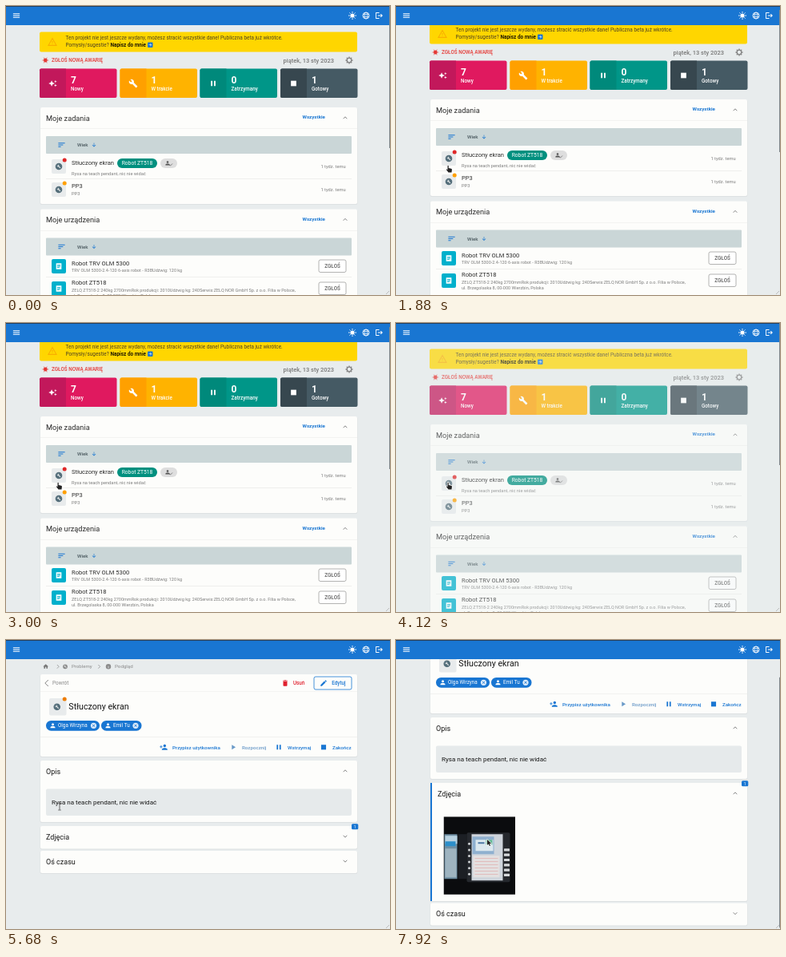
Write an HTML page with a canvas that moves like this. It is 480 by 362 pixels and loops after 8 s.

```html
<!DOCTYPE html>
<html lang="pl">
<head>
<meta charset="utf-8">
<title>Panel zgłoszeń</title>
<style>
html, body { margin: 0; width: 100%; height: 100%; overflow: hidden; background: #e8eced; }
canvas { display: block; width: 480px; height: 362px; }
</style>
</head>
<body>
<canvas id="stage" width="480" height="362"></canvas>
<script>
const ctx = document.getElementById('stage').getContext('2d');
const LOOP = 8000, W = 480, H = 362, BAR = 24;
const BLUE = '#1976d2', BG = '#e8eced', PAPER = '#fdfdfb', INK = '#2b2b2b', GREY = '#7c7c7c', SLATE = '#546e7a';

const PATHS = {
  menu: 'M3 6h18v2H3zm0 5h18v2H3zm0 5h18v2H3z',
  sort: 'M3 6h18v2H3zm0 5h13v2H3zm0 5h7v2H3z',
  home: 'M10 20v-6h4v6h5v-8h3L12 3 2 12h3v8z',
  person: 'M12 12a4 4 0 1 0 0-8 4 4 0 0 0 0 8zm0 2c-2.7 0-8 1.3-8 4v2h16v-2c0-2.7-5.3-4-8-4z',
  addPerson: 'M15 12a4 4 0 1 0 0-8 4 4 0 0 0 0 8zm0 2c-2.7 0-8 1.3-8 4v2h16v-2c0-2.7-5.3-4-8-4zM4 7h2v3h3v2H6v3H4v-3H1v-2h3z',
  trash: 'M6 19c0 1.1.9 2 2 2h8c1.1 0 2-.9 2-2V7H6zM19 4h-3.5l-1-1h-5l-1 1H5v2h14z',
  pencil: 'M3 17.25V21h3.75L17.8 9.9l-3.75-3.75zM20.7 7a1 1 0 0 0 0-1.4l-2.3-2.3a1 1 0 0 0-1.4 0l-1.8 1.8 3.75 3.75z',
  wrench: 'M22.7 19l-9.1-9.1c.9-2.3.4-5-1.5-6.9-2-2-5-2.4-7.4-1.3L9 6 6 9 1.6 4.7C.4 7.1.9 10.1 2.9 12.1c1.9 1.9 4.6 2.4 6.9 1.5l9.1 9.1c.4.4 1 .4 1.4 0l2.3-2.3c.5-.4.5-1.1.1-1.4z',
  play: 'M8 5v14l11-7z',
  pause: 'M6 19h4V5H6zm8-14v14h4V5z',
  stop: 'M5 5h14v14H5z',
  sparkle: 'M9 4l2.5 5.5L17 12l-5.5 2.5L9 20l-2.5-5.5L1 12l5.5-2.5zM19 3l1 3 3 1-3 1-1 3-1-3-3-1 3-1zm0 10l1 3 3 1-3 1-1 3-1-3-3-1 3-1z',
  logout: 'M17 7l-1.4 1.4 2.6 2.6H8v2h10.2l-2.6 2.6L17 17l5-5zM4 5h8V3H2v18h10v-2H4z',
  warning: 'M1 21h22L12 2zM12 6l7.5 13h-15zM11 10h2v4h-2zm0 5h2v2h-2z',
  down: 'M11 4h2v12l5-5 1.4 1.4L12 20l-7.4-7.6L6 11l5 5z',
  right: 'M4 11h12l-5-5 1.4-1.4L20 12l-7.6 7.4L11 18l5-5H4z',
  list: 'M4 3h16v18H4zM7 7h10v2H7zm0 4h10v2H7zm0 4h7v2H7z',
  arrow: 'M0 0v15l3.6-3.4L6 17l2.6-1.1-2.3-5.2H11z',
  hand: 'M5 1.5C5 .2 7.5.2 7.5 1.5V7l6.5 1.4c1.6.4 2 1.4 1.8 3L15 18H7L2 11.5c-.8-1.4 1-2.4 2-1.2l1 1z'
};
for (const key in PATHS) PATHS[key] = new Path2D(PATHS[key]);

const clamp = v => Math.max(0, Math.min(1, v));
const phase = (t, from, to) => clamp((t - from) / (to - from));
const ease = p => p * p * (3 - 2 * p);
const easeOut = p => 1 - (1 - p) ** 3;
const mix = (a, b, p) => a + (b - a) * p;

function rect(x, y, w, h, fill, r = 0, stroke) {
  ctx.beginPath();
  ctx.roundRect(x, y, w, h, r);
  if (fill) { ctx.fillStyle = fill; ctx.fill(); }
  if (stroke) { ctx.strokeStyle = stroke; ctx.lineWidth = .8; ctx.stroke(); }
}
function dot(x, y, r, fill) {
  ctx.beginPath();
  ctx.arc(x, y, r, 0, 7);
  ctx.fillStyle = fill;
  ctx.fill();
}
function ring(x, y, r, color, width, from = 0, to = 7) {
  ctx.beginPath();
  ctx.arc(x, y, r, from, to);
  ctx.strokeStyle = color;
  ctx.lineWidth = width;
  ctx.stroke();
}
function line(points, color, width = 1) {
  ctx.beginPath();
  points.forEach(([x, y]) => ctx.lineTo(x, y));
  ctx.strokeStyle = color;
  ctx.lineWidth = width;
  ctx.stroke();
}
function text(str, x, y, size, color = INK, weight = 400, align = 'left') {
  ctx.font = `${weight} ${size}px Roboto, sans-serif`;
  ctx.fillStyle = color;
  ctx.textAlign = align;
  ctx.fillText(str, x, y);
}
function icon(name, x, y, size, color) {
  ctx.save();
  ctx.translate(x - size / 2, y - size / 2);
  ctx.scale(size / 24, size / 24);
  ctx.fillStyle = color;
  ctx.fill(PATHS[name], 'evenodd');
  ctx.restore();
}
function spokes(x, y, inner, outer, count, color, width) {
  for (let i = 0; i < count; i++) {
    const a = i * 2 * Math.PI / count, c = Math.cos(a), s = Math.sin(a);
    line([[x + c * inner, y + s * inner], [x + c * outer, y + s * outer]], color, width);
  }
}
// dir: 1 points down, -1 points up
const chevron = (x, y, dir) => line([[x - 2.3, y - 1.2 * dir], [x, y + 1.2 * dir], [x + 2.3, y - 1.2 * dir]], '#777', .9);
const chevronSide = (x, y, dir, s, color) => line([[x - s * dir / 2, y - s], [x + s * dir / 2, y], [x - s * dir / 2, y + s]], color, .9);

function card(y, h) {
  rect(42.5, y + .5, 397, h + .5, '#dde1e2', 2);
  rect(43, y, 396, h, PAPER, 2);
}

function header() {
  rect(0, 0, W, BAR, BLUE);
  rect(0, 0, W, 1, '#25405c');
  icon('menu', 13, 12, 11, '#fff');
  dot(433, 12, 2.6, '#fff');
  spokes(433, 12, 3.4, 5, 8, '#fff', 1);
  ring(450, 12, 4, '#fff', .9);
  ctx.beginPath();
  ctx.ellipse(450, 12, 1.8, 4, 0, 0, 7);
  ctx.lineWidth = .7;
  ctx.stroke();
  line([[446, 10.6], [454, 10.6]], '#fff', .7);
  line([[446, 13.4], [454, 13.4]], '#fff', .7);
  icon('logout', 466.5, 12, 10.5, '#fff');
}

function statusCard(x, color, side, name, count, label) {
  rect(x, 78.5, 96.5, 36.5, color, 2);
  rect(x, 78.5, 33, 36.5, side, [2, 0, 0, 2]);
  icon(name, x + 16.5, 97, 11.5, '#fff');
  text(count, x + 39, 96.5, 12, '#fff', 700);
  text(label, x + 39, 106, 6.3, '#fff', 500);
}

function listHead(y, title) {
  text(title, 50, y + 16.7, 9.2);
  text('Wszystkie', 370.5, y + 14.3, 6.2, BLUE, 700);
  chevron(424, y + 13, -1);
  rect(43, y + 26.5, 396, .6, '#e9e9e7');
  rect(50, y + 36, 382, 22, '#cad6d7', 1);
  icon('sort', 69.5, y + 47, 11, BLUE);
  text('Wiek', 89, y + 49.2, 6.2, '#4c5a60', 500);
  icon('down', 110, y + 47, 7.5, BLUE);
}

function toolTile(x, y, size, badge) {
  rect(x, y, size, size, '#e8ebec', 2);
  const cx = x + size / 2 + (size > 20 ? -1 : 0), cy = y + size / 2;
  dot(cx, cy, 4.3, SLATE);
  icon('wrench', cx, cy, 5, '#e8ebec');
  dot(x + 16.2 + (size > 20 ? 3 : 0), y + 1, 2.5, badge);
}

function device(y, title, notes) {
  const lift = (notes.length - 1) * 3.2;
  rect(57, y, 18, 18, '#00b0cc', 2);
  icon('list', 66, y + 9, 10, '#fff');
  text(title, 82, y + 7.6 - lift, 7.55);
  notes.forEach((note, i) => text(note, 82, y + 15.8 - lift * .75 + i * 6.4, 5.5, GREY));
  rect(391, y + 1, 34, 15.5, '#fff', 2, '#a0a0a0');
  text('ZGŁOŚ', 408, y + 11, 6.3, '#606060', 500, 'center');
}

function mainPage() {
  rect(42, 32.5, 397, 25, '#ffd600', 2);
  icon('warning', 58, 45, 13, '#f9ae00');
  text('Ten projekt nie jest jeszcze wydany, możesz stracić wszystkie dane! Publiczna beta już wkrótce.', 74.5, 42.4, 6.42, '#4d4320');
  text('Pomysły/sugestie?', 74.5, 51.2, 6.42, '#4d4320');
  text('Napisz do mnie', 130.5, 51.2, 6.42, '#1c1800', 700);
  rect(177, 45.5, 6.5, 6.5, BLUE, 1);
  icon('right', 180.2, 48.7, 5.5, '#fff');

  spokes(49.3, 68, 2, 3.9, 6, '#e53935', .7);
  dot(49.3, 68, 2.4, '#e53935');
  text('ZGŁOŚ NOWĄ AWARIĘ', 57, 70.2, 6.3, '#e53935', 500);
  text('piątek, 13 sty 2023', 346.5, 70.7, 7.5, '#777', 500);
  ring(429, 68, 2.8, '#858585', 1.3);
  spokes(429, 68, 3, 4.5, 8, '#858585', 1.4);

  statusCard(42, '#e0195f', '#c2185b', 'sparkle', '7', 'Nowy');
  statusCard(142.5, '#ffb300', '#ffa000', 'wrench', '1', 'W trakcie');
  statusCard(242.5, '#009688', '#00897b', 'pause', '0', 'Zatrzymany');
  statusCard(343, '#455a64', '#37474f', 'stop', '1', 'Gotowy');

  card(127, 121);
  listHead(127, 'Moje zadania');
  toolTile(57, 192, 18, '#e02828');
  text('Stłuczony ekran', 82, 199.2, 7.5);
  rect(139, 191, 50, 12, '#00907f', 6);
  text('Robot ZT518', 164, 199.2, 6.7, '#fff', 400, 'center');
  rect(193, 191, 21, 12, '#dedede', 6);
  icon('person', 202, 196.8, 8, '#555');
  line([[204, 199], [205.5, 200], [208, 197.5]], '#555', .7);
  text('Rysa na teach pendant, nic nie widać', 82, 211.8, 5.7, GREY);
  text('1 tydz. temu', 393.5, 203, 5.7, GREY);
  rect(50, 216, 382, .6, '#e2e2e0');
  toolTile(57, 221, 18, '#ffa000');
  text('PP3', 82, 228.2, 7.5);
  text('PP3', 82, 236.5, 5.7, GREY);
  text('1 tydz. temu', 393.5, 231.7, 5.7, GREY);

  card(254.5, 140);
  listHead(254.5, 'Moje urządzenia');
  device(317, 'Robot TRV OLM 5300', ['TRV OLM 5300-2.4-120 6-axis robot - R3BUdźwig: 120 kg']);
  rect(50, 339.5, 382, .6, '#e2e2e0');
  device(345, 'Robot ZT518', [
    'ZELQ ZT518-2 240kg 2700mmRok produkcji: 2010Udźwig kg: 240Serwis:ZELQ NOR GmbH Sp. z o.o. Filia w Polsce,',
    'ul. Brzegolaska 8, 00-000 Wierzbin, Polska']);
}

function userChip(x, w, name) {
  rect(x, 101, w, 12.7, BLUE, 6.3);
  icon('person', x + 8.5, 107.2, 9, '#fff');
  text(name, x + 15, 109.4, 6.3, '#fff');
  const cx = x + w - 7.5;
  dot(cx, 107.3, 3.6, '#dcebfa');
  line([[cx - 1.5, 105.8], [cx + 1.5, 108.8]], BLUE, .9);
  line([[cx + 1.5, 105.8], [cx - 1.5, 108.8]], BLUE, .9);
}

function action(x, name, label, color = BLUE) {
  icon(name, x, 134.3, 10.5, color);
  text(label, x + 11, 136.6, 6.2, color, 500);
}

function photo(x, y, veil) {
  ctx.save();
  ctx.beginPath();
  ctx.rect(x, y, 89.5, 97.5);
  ctx.clip();
  rect(x, y, 90, 98, '#0b0c0e');
  rect(x + 1, y + 22, 16, 56, '#6f8fa3');
  rect(x + 2, y + 24, 15, 10, '#b9d2e0');
  rect(x + 2, y + 31, 13, 6, '#2d8fca');
  rect(x + 2, y + 40, 14, 36, '#9fb4c0');
  rect(x + 18, y + 22, 11, 56, '#1c1f24');
  rect(x + 29, y + 20, 54, 62, '#25282d', 2);
  rect(x + 35, y + 22, 39, 58, '#cfd5dc');
  rect(x + 36, y + 25, 27, 22, '#8fb0cf');
  rect(x + 40, y + 29, 22, 14, '#dce8ee');
  rect(x + 43, y + 32, 8, 2, '#4d78a4');
  rect(x + 53, y + 29, 8, 6, '#63b794');
  rect(x + 37, y + 49, 33, 27, '#e3e0e0');
  for (let i = 0; i < 6; i++) {
    dot(x + 32, y + 34 + i * 7.6, 1.5, '#cfd2d4');
    rect(x + 75.5, y + 40 + i * 6.3, 7, 3.2, '#d5d8da', .5);
    rect(x + 39, y + 52 + i * 4, 29, .5, '#d99');
  }
  if (veil > 0) rect(x, y, 90, 98, `rgba(214,214,214,${veil})`);
  ctx.restore();
}

function detailPage(t) {
  icon('home', 49.7, 33.2, 8, '#777');
  chevronSide(65, 33.3, 1, 2.3, '#999');
  dot(74, 33.3, 2.9, '#8c8c8c');
  icon('wrench', 74, 33.3, 3.5, BG);
  text('Problemy', 82, 35.4, 6.1, '#8a8a8a');
  chevronSide(116.5, 33.3, 1, 2.3, '#999');
  dot(128, 33.3, 3.2, '#8c8c8c');
  rect(127.6, 32.8, .8, 2.4, BG);
  text('Podgląd', 136, 35.4, 6.2, '#8a8a8a');

  card(43, 103);
  chevronSide(50.8, 54, -1, 4, '#777');
  text('Powrót', 58, 56.2, 6.4, '#8a8a8a');
  icon('trash', 349, 54, 10, '#e0202e');
  text('Usuń', 359, 56.2, 6.3, '#e0202e', 500);
  rect(385, 46, 47, 16, null, 2, BLUE);
  icon('pencil', 397, 54, 10, BLUE);
  text('Edytuj', 407.3, 56.2, 6.3, BLUE, 500);
  rect(43, 64.5, 396, .6, '#ececea');
  toolTile(54, 73, 21.5, '#ee7d00');
  text('Stłuczony ekran', 78.3, 87, 10.7, '#151515');
  userChip(50, 67, 'Olga Wirzyna');
  userChip(119, 50.5, 'Emil Tu');
  rect(43, 121.5, 396, .6, '#e6e6e4');
  action(197, 'addPerson', 'Przypisz użytkownika');
  action(284, 'play', 'Rozpocznij', '#6b9ac8');
  action(341, 'pause', 'Wstrzymaj');
  action(397, 'stop', 'Zakończ');

  card(151, 77);
  text('Opis', 50, 168.2, 9, '#151515');
  chevron(424, 164, -1);
  rect(50, 186.5, 382, 33.5, '#e6eaeb', 2);
  text('Rysa na teach pendant, nic nie widać', 57, 206, 8.05, '#151515');

  const open = ease(phase(t, 6520, 6880));
  const height = mix(28.5, 148, open);
  card(233, height);
  ctx.save();
  ctx.beginPath();
  ctx.rect(43, 233, 396, height);
  ctx.clip();
  if (open > 0) {
    rect(43, 233, 2 * open, height, BLUE);
    photo(59.5, 275.3, .72 * (1 - phase(t, 7400, 7640)));
    if (t < 7480) {
      const a = t / 180;
      ring(104, 324, 9, '#4a4a4a', 2.4, a, a + 2.2);
    }
  }
  ctx.restore();
  text('Zdjęcia', 50 + 2 * open, 249.6, 9, '#151515');
  chevron(424, 246, open > .5 ? -1 : 1);
  rect(432, 230.3, 8.3, 7, BLUE, 1.5);
  text('1', 436.1, 235.7, 5, '#fff', 400, 'center');

  const top = 236 + height - .5;
  card(top, 28);
  text('Oś czasu', 50, top + 16.8, 9, '#151515');
  chevron(424, top + 13, 1);
}

function scrollbar(scroll, pageHeight) {
  rect(479, scroll * H / pageHeight, 1, H * H / pageHeight, '#7f878b');
}

function pointer(name, x, y, size) {
  ctx.save();
  ctx.translate(x, y);
  ctx.scale(size / 18, size / 18);
  ctx.lineJoin = 'round';
  ctx.lineWidth = 2.6;
  ctx.strokeStyle = '#fff';
  ctx.stroke(PATHS[name]);
  ctx.fillStyle = '#222';
  ctx.fill(PATHS[name]);
  ctx.restore();
}
function textCursor(x, y) {
  line([[x, y - 4], [x, y + 4]], '#555', .9);
  line([[x - 1.8, y - 4.2], [x + 1.8, y - 4.2]], '#555', .8);
  line([[x - 1.8, y + 4.2], [x + 1.8, y + 4.2]], '#555', .8);
}

function cursor(t) {
  if (t < 80) return;
  if (t < 1000) {
    const p = ease(phase(t, 80, 800));
    pointer('arrow', mix(18, 63, p), mix(294, 199, p), 8.5);
  } else if (t < 4880) {
    pointer('hand', 62, 199.5, 9);
  } else if (t < 5720) {
    textCursor(67, 208.8);
  } else {
    const go = ease(phase(t, 5680, 6480)), back = ease(phase(t, 7440, 7840));
    const x = mix(mix(66, 410, go), 114, back);
    const y = mix(mix(206, 247, go) + 16 * Math.sin(Math.PI * go), 250, back);
    pointer('arrow', x, y, 8.5);
  }
}

function draw(t) {
  rect(0, 0, W, H, BG);
  const detail = t >= 4400;
  const scroll = Math.round(detail
    ? 54 * ease(phase(t, 7380, 7900))
    : (10 * phase(t, 1780, 1880) + 5 * easeOut(phase(t, 1880, 2600))) * (1 - ease(phase(t, 2680, 3480))));
  const shown = detail ? phase(t, 4440, 4680) : 1 - phase(t, 4040, 4320);

  ctx.save();
  ctx.translate(0, -scroll);
  if (detail) detailPage(t); else mainPage();
  ctx.restore();
  ctx.globalAlpha = 1 - shown;
  rect(0, 0, W, H, BG);
  ctx.globalAlpha = 1;

  header();
  if (!detail) scrollbar(scroll, 736);
  else if (t >= 6700) scrollbar(scroll, 418);
  line([[475, 361], [479, 357]], '#aaa', .7);
  cursor(t);
}

function tick(now) {
  draw(now % LOOP);
  requestAnimationFrame(tick);
}
draw(0);
requestAnimationFrame(tick);
</script>
</body>
</html>
```
